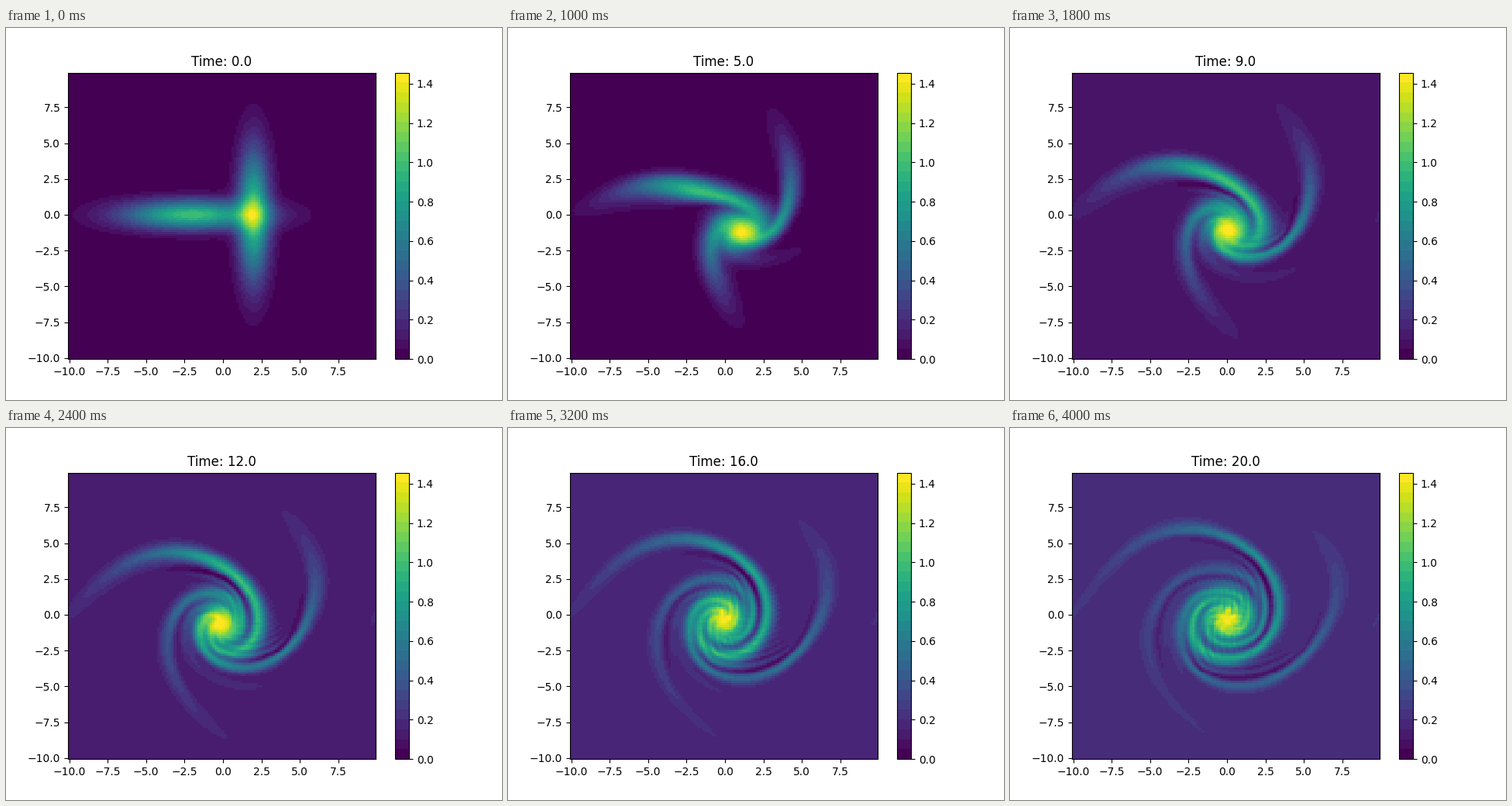
These frames come from a looping animation (640 by 480 pixels, 4200 ms). A matplotlib script:

```python
import numpy as np
import matplotlib.pyplot as plt
from matplotlib.animation import FuncAnimation
from matplotlib.cm import ScalarMappable
from matplotlib.colors import Normalize

L, N = 20.0, 128
VISCOSITY = 0.001
DT, STEPS = 0.1, 10          # ten steps per unit of time
FRAMES, INTERVAL = 21, 200
BANDS = 29

h = L / N
axis = -L / 2 + h * np.arange(N)
X, Y = np.meshgrid(axis, axis)

kx = 2 * np.pi * np.fft.rfftfreq(N, h)
ky = 2 * np.pi * np.fft.fftfreq(N, h)
K2 = kx[None, :] ** 2 + ky[:, None] ** 2
K2[0, 0] = 1.0


def diff(f, ax):
    return (np.roll(f, -1, ax) - np.roll(f, 1, ax)) / (2 * h)


def laplacian(f):
    return sum(np.roll(f, s, a) for s in (-1, 1) for a in (0, 1)) / h**2 - 4 * f / h**2


def rate(w):
    """Vorticity equation with the stream function solved by FFT."""
    spectrum = -np.fft.rfft2(w) / K2
    spectrum[0, 0] = 0
    psi = np.fft.irfft2(spectrum, s=w.shape)
    advection = diff(psi, 0) * diff(w, 1) - diff(psi, 1) * diff(w, 0)
    return VISCOSITY * laplacian(w) - advection


def rk4(w):
    a = rate(w)
    b = rate(w + DT / 2 * a)
    c = rate(w + DT / 2 * b)
    d = rate(w + DT * c)
    return w + DT / 6 * (a + 2 * b + 2 * c + d)


def simulate():
    w = np.exp(-(X - 2) ** 2 - Y**2 / 20) + np.exp(-(X + 2) ** 2 / 20 - Y**2)
    history = [w]
    for _ in range(FRAMES - 1):
        for _ in range(STEPS):
            w = rk4(w)
        history.append(w)
    return history


def banded(w):
    """Scale to 0..1 and step the shades, keeping still fluid in one band."""
    low, high = w.min(), w.max()
    rest = max(0.0, -low / (high - low))
    shade = (w - low) / (high - low)
    slack = 0.02 if rest < 0.01 else 0.4
    steps = np.floor((shade - rest) * BANDS + slack)
    return np.clip(rest + steps / (BANDS - 1), 0, 1)


history = simulate()

fig, ax = plt.subplots(figsize=(6.4, 4.8), dpi=100)
mesh = ax.pcolormesh(X, Y, banded(history[0]), cmap="viridis",
                     vmin=0, vmax=1, shading="nearest")
scale = ScalarMappable(Normalize(0, history[0].max()),
                       plt.get_cmap("viridis", BANDS))
fig.colorbar(scale, ax=ax)
title = ax.set_title("Time: 0.0")


def update(i):
    mesh.set_array(banded(history[i]))
    title.set_text(f"Time: {float(i):.1f}")
    return mesh, title


anim = FuncAnimation(fig, update, frames=FRAMES, interval=INTERVAL,
                     repeat=True, repeat_delay=0)
plt.show()
```
